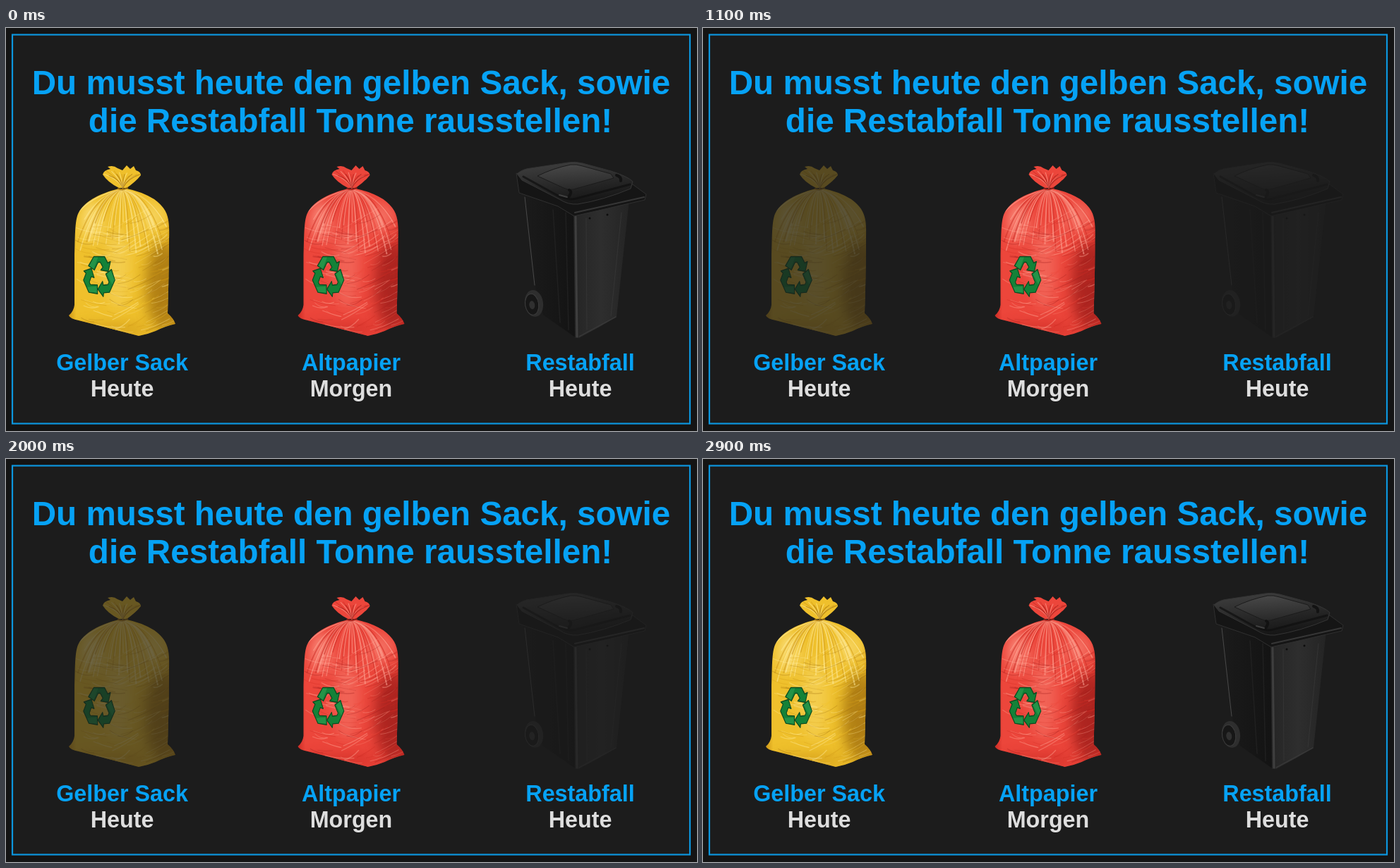
Recreate the animation shown at these times as an HTML page. Size 979 by 572 pixels, loop 3000 ms.

```html
<!DOCTYPE html>
<html lang="de">
<head>
<meta charset="utf-8">
<title>Müllkalender</title>
<style>
  html, body { margin: 0; width: 100%; height: 100%; overflow: hidden; background: #141414; }
  svg { display: block; }
  text { font: bold 32.3px "Liberation Sans", Arial, sans-serif; text-anchor: middle; fill: #06a2f5; }
  .title { font-size: 47.6px; }
  .day { fill: #dedede; }
  .soft { filter: blur(.5px); }
</style>
</head>
<body>
<svg id="stage" width="979" height="572" viewBox="0 0 979 572"></svg>
<script>
const LOOP = 3000, STEP = 100, FADE = 1400;

function seeded(seed) {
  return (min, max) => {
    seed = (seed * 16807) % 2147483647;
    return min + (max - min) * seed / 2147483647;
  };
}

const curve = (d, color, width, opacity) =>
  `<path d="${d}" fill="none" stroke="${color}" stroke-width="${width.toFixed(1)}"
    stroke-linecap="round" opacity="${opacity}"/>`;
const shape = (d, fill, more = '') => `<path d="${d}" fill="${fill}" ${more}/>`;
const glow = (cx, cy, rx, ry, fill, opacity) =>
  `<ellipse cx="${cx}" cy="${cy}" rx="${rx}" ry="${ry}" fill="${fill}" opacity="${opacity}" style="filter:blur(9px)"/>`;

const BODY = `M160 228C140 233 113 243 103 262C97 272 98 300 97 325L97 393Q96 402 89 408
  Q91 413 103 415Q150 427 188 437Q200 435 212 430Q226 423 240 420Q238 413 229 405
  Q231 345 231 300C232 270 230 258 210 243Q192 232 171 228Z`;
const BOW = `M160 227Q144 219 137 208Q138 202 148 200L144 197Q152 194 158 199L165 202L171 195
  L176 200L181 196L184 202Q191 204 191 209Q184 218 171 227Z`;

// Three folded arrows around one centre
function recycle() {
  const arrow = 'M-20-15L-10-28H10L16-19L21-21L17-7L3-9L7-13L2-20H-2L-9-9Z';
  return `<g transform="translate(132 352.5) scale(.76 1)" stroke="#0b4a20" stroke-width="1.4" stroke-linejoin="round">
    ${[0, 120, 240].map(a => `<g transform="rotate(${a})">
      ${shape(arrow, '#148238')}${shape('M-10-27H-2L-10-11L-18-15Z', '#249348', 'stroke="none"')}
    </g>`).join('')}</g>`;
}

function bag(id, shift, { light, base, shade, deep }) {
  const rnd = seeded(4711);
  let folds = '', pleats = '';

  // Pleats fan out below the knot
  for (let i = 0; i < 44; i++) {
    const x = 99 + i * 3.05, mid = 165 + (x - 165) * .65;
    const y = 256 + rnd(0, 62) + Math.abs(x - 165) * .1;
    folds += curve(`M${165 + (x - 165) * .08} 230Q${mid} 238 ${x} ${y}`,
      [light, shade, light, base][i % 4], rnd(.7, 2.2), .55);
  }
  // Fine creases run across the belly, steeper on the right
  for (let i = 0; i < 190; i++) {
    const x = rnd(94, 222), y = rnd(275, 430), length = rnd(12, 42);
    const rise = (x > 150 ? -.5 : .2) * length + rnd(-5, 5);
    folds += curve(`M${x} ${y}q${length / 2} ${rise / 2 + rnd(1, 6)} ${length} ${rise}`,
      [light, shade, base, light, deep][i % 5], rnd(.5, 1.5), i % 5 == 4 ? .3 : .4);
  }
  for (let i = 0; i < 15; i++)
    pleats += curve(`M165.5 227Q${158 + i} 214 ${139 + i * 3.6} ${202 + rnd(0, 8)}`,
      [light, shade, deep][i % 3], 1.1, .6);

  return `<defs>
      <linearGradient id="${id}-body">
        <stop stop-color="${shade}"/><stop offset=".07" stop-color="${base}"/>
        <stop offset=".9" stop-color="${base}"/><stop offset="1" stop-color="${shade}"/>
      </linearGradient>
      <clipPath id="${id}-clip"><path d="${BODY}"/></clipPath>
    </defs>
    <g transform="translate(${shift})" class="soft">
      ${shape(BOW, base)}${pleats}
      ${shape(BODY, `url(#${id}-body)`)}
      <g clip-path="url(#${id}-clip)">
        ${glow(122, 275, 13, 28, light, .75)}
        ${glow(205, 270, 18, 20, light, .45)}
        ${glow(158, 340, 18, 60, light, .3)}
        ${glow(222, 365, 24, 65, deep, .75)}
        ${glow(150, 428, 55, 8, shade, .8)}
        ${folds}
      </g>
      ${curve('M159 228Q165 231 172 227', deep, 2.5, .8)}
      ${recycle()}
    </g>`;
}

function bin() {
  return `<defs>
      <linearGradient id="bin-side"><stop stop-color="#1b1b1b"/><stop offset="1" stop-color="#131313"/></linearGradient>
      <linearGradient id="bin-front"><stop stop-color="#252525"/><stop offset=".5" stop-color="#2e2e2e"/><stop offset="1" stop-color="#242424"/></linearGradient>
      <linearGradient id="bin-lid" x2=".3" y2="1"><stop stop-color="#414141"/><stop offset="1" stop-color="#171717"/></linearGradient>
      <linearGradient id="bin-panel" x2=".2" y2="1"><stop stop-color="#4a4a4a"/><stop offset="1" stop-color="#2a2a2a"/></linearGradient>
    </defs>
    <g class="soft" stroke-linejoin="round">
      ${shape('M733 232L805 258L808 440L761 407L751 372Z', 'url(#bin-side)')}
      ${shape('M804 262L883 244L865 410Q840 425 812 440L806 440Z', 'url(#bin-front)')}
      ${curve('M735 240L749 365', '#555', 1, .8)}
      ${curve('M775 258L785 418M793 262L797 428', '#242424', 1.5, .8)}
      ${curve('M807 268L809 438', '#454545', 3, .8)}
      ${curve('M822 270L823 428M872 262L857 409', '#393939', 1, .7)}
      ${curve('M812 438L864 410', '#3a3a3a', 1.5, .8)}
      <g transform="rotate(-8 747 391)">
        <ellipse cx="748" cy="391" rx="13" ry="19" fill="#2e2e2e"/>
        <ellipse cx="745" cy="392" rx="9.5" ry="15" fill="#171717" stroke="#3c3c3c"/>
        <ellipse cx="745" cy="393" rx="4" ry="6" fill="#303030"/>
      </g>
      ${shape('M723 206L727 234L782 253L805 267L905 244L907 236L888 222L805 248Z', '#151515', 'stroke="#303030"')}
      ${curve('M806 262L904 240', '#3f3f3f', 2, .8)}
      ${shape('M724 207Q732 200 743 199L796 191Q806 189 817 192L857 203Q882 211 888 218L885 228Q847 244 810 250Q796 251 784 243L731 216Z', 'url(#bin-lid)', 'stroke="#353535"')}
      ${shape('M753 210Q775 199 800 194Q808 193 817 196L857 207L861 213L804 229Q797 231 790 227Z', 'url(#bin-panel)', 'stroke="#1b1b1b"')}
      ${curve('M733 211L782 238Q795 245 808 242L884 222', '#0f0f0f', 3, .7)}
      ${curve('M797 240Q803 232 798 230M871 217Q872 211 865 209', '#111', 4, .9)}
      ${curve('M784 237L795 240', '#484848', 2, .8)}
      <circle cx="827" cy="270" r="1.5" fill="#0d0d0d"/><circle cx="852" cy="265" r="1.5" fill="#0d0d0d"/>
    </g>`;
}

const label = (x, name, day) =>
  `<text x="${x}" y="486">${name}</text><text class="day" x="${x}" y="523">${day}</text>`;

const yellow = { light: '#ffeb9c', base: '#efc02c', shade: '#cf9818', deep: '#9c6a0c' };
const red = { light: '#ffa897', base: '#ec463b', shade: '#cc2c25', deep: '#981a17' };

document.getElementById('stage').innerHTML = `
  <rect x="9" y="9.5" width="960" height="552" fill="#1c1c1c" stroke="#0c96de" stroke-width="2.2"/>
  <g class="soft">
    <text class="title" x="489" y="94">Du musst heute den gelben Sack, sowie</text>
    <text class="title" x="488" y="148">die Restabfall Tonne rausstellen!</text>
    ${label(164.5, 'Gelber Sack', 'Heute')}
    ${label(489, 'Altpapier', 'Morgen')}
    ${label(813.5, 'Restabfall', 'Heute')}
  </g>
  <g id="due">${bag('yellow', 0, yellow)}${bin()}</g>
  ${bag('red', 324.5, red)}`;

const due = document.getElementById('due');

// Fades out until half time and back, resting briefly at full strength
function draw() {
  const time = Math.floor(performance.now() % LOOP / STEP) * STEP;
  due.setAttribute('opacity', Math.min(1, Math.abs(time - LOOP / 2) / FADE));
  requestAnimationFrame(draw);
}
draw();
</script>
</body>
</html>
```
